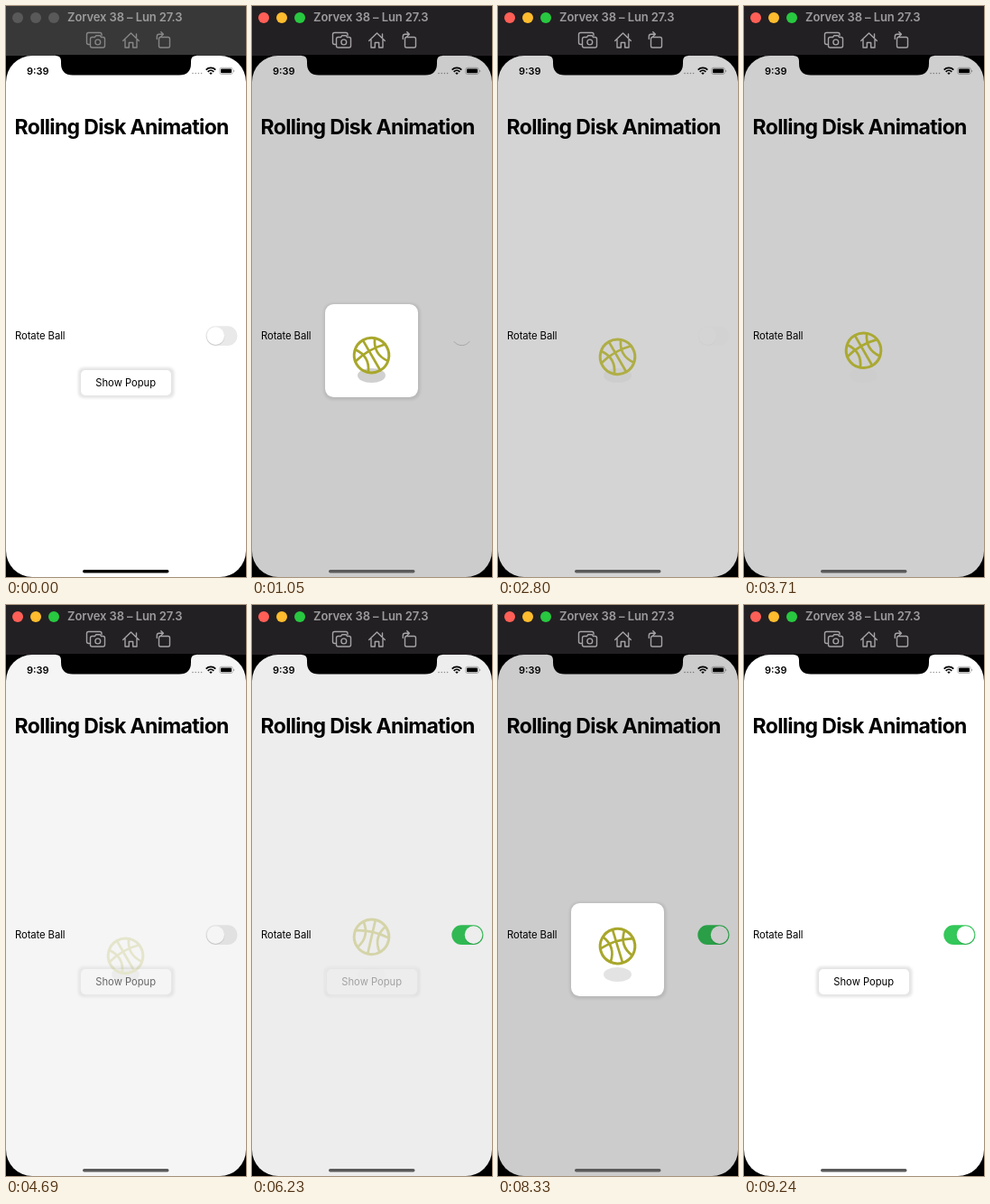
These frames come from a looping animation (266x632 px, 9590 ms). An HTML page:

```html
<!DOCTYPE html>
<html lang="en">
<head>
<meta charset="utf-8">
<title>Popup with a bouncing ball</title>
<style>
html, body { margin: 0; width: 100%; height: 100%; overflow: hidden; background: #000; }
svg { display: block; width: 100vw; height: 100vh; }
text { font-family: Inter, "Liberation Sans", sans-serif; }
.line { fill: none; stroke-linecap: round; stroke-linejoin: round; }
</style>
</head>
<body>
<svg viewBox="0 0 266 632">
  <defs>
    <clipPath id="screenClip"><rect y="55" width="266" height="577" rx="29"/></clipPath>
    <filter id="soft" x="-20%" y="-40%" width="140%" height="180%"><feGaussianBlur stdDeviation="1.5"/></filter>
  </defs>

  <rect width="266" height="632"/>
  <rect id="chrome" width="266" height="55"/>
  <g id="lights"></g>
  <text x="68" y="17.3" font-size="13" font-weight="600" letter-spacing="-.1" fill="#9c9b9c">Zorvex 38 – Lun 27.3</text>

  <g id="tools" class="line" stroke-width="1.4">
    <path d="M92.5 42.5H91.500a2 2 0 0 1-2-2V31.500a2 2 0 0 1 2-2H104a2 2 0 0 1 2 2V32.500"/>
    <path d="M95.500 34.500h3l1.200-1.700h4.600l1.200 1.700h2a2 2 0 0 1 2 2v7.500a2 2 0 0 1-2 2h-12a2 2 0 0 1-2-2v-7.500a2 2 0 0 1 2-2z"/>
    <circle cx="101.800" cy="40" r="2.900"/>
    <path d="M129.700 38.500 138.500 30 147.300 38.500M132 37V46H136.300V40.500H140.700V46H145V37M144.500 34.500V31"/>
    <rect x="169.500" y="34.500" width="12" height="11.500" rx="1.800"/>
    <path d="M167.300 36.500V33.500a2.300 2.300 0 0 1 2.300-2.300H174M171.800 28.700 174.400 31.200 171.800 33.700"/>
  </g>

  <g clip-path="url(#screenClip)">
    <rect y="55" width="266" height="577" fill="#fff"/>
    <text x="23" y="76" font-size="11" font-weight="600">9:39</text>
    <g id="signal" fill="#999"></g>
    <g class="line" stroke="#000" stroke-width="1.700" style="stroke-linecap:butt">
      <path d="M221.700 70.600a7.500 7.500 0 0 1 10.600 0M223.700 72.800a4.700 4.700 0 0 1 6.600 0"/>
    </g>
    <path d="M225.300 74.300a2.500 2.500 0 0 1 3.400 0L227 76z"/>
    <rect x="236.800" y="68.300" width="14.400" height="7.200" rx="2" fill="none" stroke="#999" stroke-width=".7"/>
    <rect x="238" y="69.500" width="12" height="4.800" rx="1"/>
    <path d="M252.300 70.700v2.400q1-.4 1-1.200t-1-1.200z" fill="#999"/>

    <text x="9.500" y="142" font-size="23" font-weight="700" letter-spacing="-.65">Rolling Disk Animation</text>
    <text x="10" y="369.200" font-size="11.300" letter-spacing="-.1">Rotate Ball</text>

    <g id="toggle">
      <rect id="track" x="221.300" y="354.200" width="35.200" height="21.800" rx="10.900"/>
      <circle id="knobShade" cy="366" r="10" fill="#000" opacity=".13"/>
      <circle id="knob" cy="365.100" r="9.800" fill="#fff"/>
    </g>

    <g id="button">
      <rect x="80" y="400" width="106.500" height="34" rx="6" fill="#000" opacity=".1" filter="url(#soft)"/>
      <rect x="83" y="403" width="100" height="28" rx="5" fill="#fff"/>
      <text x="132.700" y="421" font-size="11.200" text-anchor="middle">Show Popup</text>
    </g>

    <rect id="dim" y="55" width="266" height="577"/>
    <path id="arc" class="line" d="M224 371.500a10.500 10.500 0 0 0 17 0" stroke="#999" stroke-width=".7"/>

    <g id="popup">
      <rect id="cardShade" x="79.500" y="329" width="107" height="107" rx="10" fill="#000" opacity=".09" filter="url(#soft)"/>
      <rect id="card" x="81" y="330" width="103" height="103" rx="9.500"/>
      <ellipse id="floor" cx="132.500" cy="409" rx="15.500" ry="8" fill="#ccc"/>
      <g id="ball" class="line" stroke="#a8a72b" stroke-width="3">
        <circle r="19.300"/>
        <path d="M0-19V19M-19-3Q0-8 19-3M-12.500-14.500Q-2 0-12.500 14.500M12.500-14.500Q2 0 12.500 14.500" stroke-width="2.700"/>
      </g>
    </g>
  </g>

  <path d="M55 54H211V55Q205 55 205 61V63.500Q205 76.500 192 76.500H74Q61 76.500 61 63.500V61Q61 55 55 55z"/>
  <rect id="home" x="85" y="624" width="95.500" height="3.400" rx="1.700"/>
</svg>

<script>
const LOOP = 9590, FADE = 350, HALF = 400;
const ACTIVE_AT = 70, TOGGLE_AT = 5330, TOGGLE_TIME = 250;
const BALL_TOP = 364.5, BALL_LOW = 388.3, TILT = -30, SPIN = 0.5;
const popups = [
  { open: 540, drop: 585, close: 2712 },
  { open: 3410, drop: 3455, close: 4440 },
  { open: 6092, drop: 6145, close: 8575 }
];

const el = {};
document.querySelectorAll("[id]").forEach(n => el[n.id] = n);
const set = (id, attrs) => {
  for (const key in attrs) el[id].setAttribute(key, attrs[key]);
};
const add = (parent, cx, cy, r) => {
  const dot = document.createElementNS("http://www.w3.org/2000/svg", "circle");
  for (const [key, value] of Object.entries({ cx, cy, r })) dot.setAttribute(key, value);
  parent.append(dot);
  return dot;
};
const clamp = x => Math.max(0, Math.min(1, x));
const ease = x => { x = clamp(x); return x * x * (3 - 2 * x); };
const mix = (a, b, p) => a + (b - a) * p;
const gray = v => `rgb(${v},${v},${v})`;

const lights = [13, 33, 53].map(x => add(el.lights, x, 13, 6));
for (let i = 0; i < 4; i++) add(el.signal, 207 + i * 3.2, 74.5, 0.8);

function drawWindow(active) {
  const colors = active ? ["#ff5f57", "#febc2e", "#28c840"] : ["#59595a", "#59595a", "#59595a"];
  lights.forEach((dot, i) => dot.setAttribute("fill", colors[i]));
  set("chrome", { fill: active ? "#232023" : "#383838" });
  set("tools", { stroke: active ? "#a5a3a5" : "#868686" });
  set("home", { fill: active ? "#5a5a5a" : "#000" });
}

function drawToggle(on, shown) {
  const rgb = [[233, 52], [233, 199], [234, 89]].map(([a, b]) => Math.round(mix(a, b, on)));
  const cx = mix(232.3, 245.5, on);
  set("track", { fill: `rgb(${rgb})` });
  set("knob", { cx });
  set("knobShade", { cx });
  set("toggle", { opacity: on > 0 ? 1 : clamp(1.2 - 1.3 * shown) });
}

function drawPopup(t, on) {
  const p = popups.find(q => t >= q.open && t < q.close + FADE);
  const closing = p && t >= p.close;
  const shown = !p ? 0 : closing ? 1 - ease((t - p.close) / FADE) : ease((t - p.open) / FADE);
  const settled = shown === 1;
  set("dim", { opacity: 0.2 * shown });
  set("button", { opacity: clamp(1 - 1.5 * shown) });
  set("popup", { opacity: shown });
  // While fading, the card lies under the dimmed layer.
  set("card", { fill: settled ? "#fff" : gray(Math.round(255 - 51 * shown)) });
  set("cardShade", { visibility: settled ? "visible" : "hidden" });
  set("arc", { opacity: settled && !on ? 1 : 0 });

  const age = p && !closing ? Math.max(0, t - p.drop) : HALF;
  const phase = age / HALF % 2;
  const fall = ease(phase < 1 ? phase : 2 - phase);
  const angle = TILT + (on && !closing ? age * SPIN : 0);
  set("floor", { opacity: fall });
  set("ball", { transform: `translate(132.5 ${mix(BALL_TOP, BALL_LOW, fall)}) rotate(${angle})` });
  return shown;
}

function draw(t) {
  const on = ease((t - TOGGLE_AT) / TOGGLE_TIME);
  drawWindow(t >= ACTIVE_AT);
  drawToggle(on, drawPopup(t, on > 0));
}

const start = performance.now();
function tick() {
  draw((performance.now() - start) % LOOP);
  requestAnimationFrame(tick);
}
tick();
</script>
</body>
</html>
```
